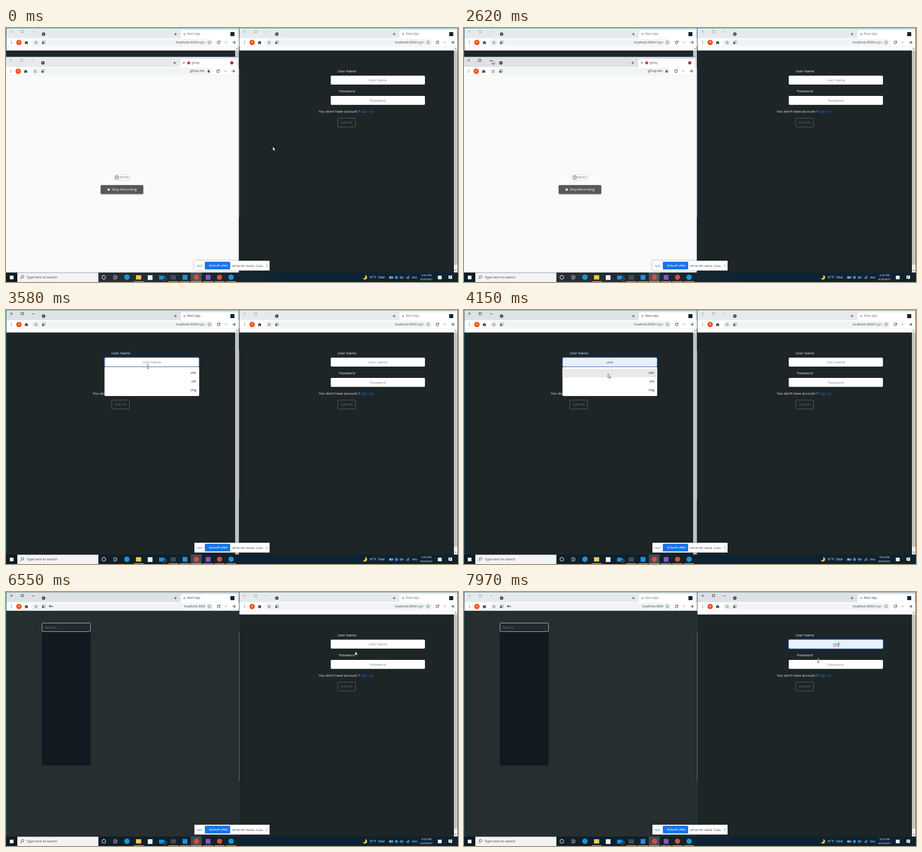
Recreate the animation shown at these times as an HTML page with a canvas. Size 998 by 561 pixels, loop 8000 ms.

```html
<!DOCTYPE html>
<html lang="en">
<head>
<meta charset="utf-8">
<title>Login demo</title>
<style>
  html, body { margin: 0; width: 100%; height: 100%; overflow: hidden; background: #1d2527; }
  canvas { display: block; }
</style>
</head>
<body>
<canvas id="stage" width="998" height="561"></canvas>
<script>
const g = document.getElementById('stage').getContext('2d');
const LOOP = 8000, SANS = '"Open Sans", "Noto Sans", sans-serif', ARABIC = '"DejaVu Sans", sans-serif';
const USERS = ['uhe', 'uht', 'uhg'];
const PAGE = '#1d2527', EDGE = '#245364';

// Pointer path: time, x, y
const POINTER = [
  [0, 589, 262], [480, 589, 262], [1300, 300, 75], [1420, 296, 75], [2060, 72, 72], [2180, 72, 72],
  [2220, 62, 71], [2655, 62, 71], [2660, 155, 83], [2710, 155, 83], [3060, 313, 125],
  [3600, 313, 125], [4000, 318, 141], [4340, 318, 141], [4510, 322, 155], [5600, 322, 155],
  [6160, 602, 148], [6360, 602, 148], [6550, 771, 131], [6650, 771, 131], [6950, 780, 117],
  [7400, 780, 117], [7750, 782, 152], [8000, 782, 152]];

function rect(x, y, w, h, fill) { g.fillStyle = fill; g.fillRect(x, y, w, h); }

function box(x, y, w, h, r, fill, stroke, width = 1) {
  g.beginPath();
  g.roundRect(x, y, w, h, r);
  if (fill) { g.fillStyle = fill; g.fill(); }
  if (stroke) { g.strokeStyle = stroke; g.lineWidth = width; g.stroke(); }
}

function dot(x, y, r, fill, stroke, width = 1) {
  g.beginPath();
  g.arc(x, y, r, 0, 7);
  if (fill) { g.fillStyle = fill; g.fill(); }
  if (stroke) { g.strokeStyle = stroke; g.lineWidth = width; g.stroke(); }
}

function path(x, y, d, stroke, width = 1, fill) {
  g.save();
  g.translate(x, y);
  const p = new Path2D(d);
  if (fill) { g.fillStyle = fill; g.fill(p); }
  if (stroke) { g.strokeStyle = stroke; g.lineWidth = width; g.stroke(p); }
  g.restore();
}

function text(s, x, y, size, fill, align = 'left', font = SANS, weight = 400) {
  g.font = `${weight} ${size}px ${font}`;
  g.textAlign = align;
  g.textBaseline = 'middle';
  g.fillStyle = fill;
  g.fillText(s, x, y);
  return g.measureText(s).width;
}

// Browser frame; left items hang on l, right items on r
function browser(l, r, y, o) {
  const ink = o.active ? '#202124' : '#9b9fa3', gray = '#5f6368';
  const x = Math.max(l, 0), w = r - x;
  g.save();
  g.translate(0, y);
  rect(x, 0, w, 23, o.active ? '#dee1e6' : '#e7eaed');
  rect(x, 22.5, w, 18.5, '#fff');
  rect(x, 41, w, .5, '#d5d7da');
  rect(x, 0, w, .6, EDGE);
  box(r - 129, 5, 125, 19, [4, 4, 0, 0], '#fff');
  path(l + 12, 8, 'M-2.5-2.5 2.5 2.5M2.5-2.5-2.5 2.5', ink, .9);
  box(l + 33.5, 5.5, 5, 5, 0, null, ink, .9);
  path(l + 60, 8.5, 'M-2.5 0H2.5', ink, .9);
  dot(l + 83, 13.5, 3.8, '#3c4043');
  path(l + 83, 13.5, 'M-1.7-.8H1.7L0 1.4Z', null, 1, '#fff');
  path(r - 141, 13.5, 'M-3 0H3M0-3V3', '#3c4043');
  path(r - 121, 13.5, 'M-2-2 2 2M2-2-2 2', '#3c4043', .9);

  if (o.recorder) {
    dot(r - 110, 13.5, 3.2, '#e0392f');
    text(o.title, r - 103.5, 13.5, 6.2, '#555');
    dot(r - 15, 13.5, 3.5, '#a8322d');
  } else {
    text(o.title, r - 115, 13.5, 6.2, o.active ? '#3c4043' : '#666a6e');
    box(r - 19.5, 9, 9, 9, 1, '#15232d');
  }

  box(l + 56, 24.5, r - l - 113, 15, 7.5, '#f1f3f4');
  for (const dy of [-2.7, 0, 2.7]) dot(l + 12, 32 + dy, .8, '#3c4043');
  dot(l + 28.5, 32, 6, '#f4511e');
  text('a', l + 28.5, 31.5, 7, '#fff', 'center');
  path(l + 45, 32, 'M-3.5-2H-1.2A1.2 1.2 0 0 1 1.2-2H3V0A1.2 1.2 0 0 1 3 2.2V3.7H1A1.2 1.2 0 0 0-1.4 3.7H-3.5V1.8A1.2 1.2 0 0 0-3.5-.4Z', null, 1, '#4a4d51');
  path(l + 66, 32, 'M0-3.5 1-1.1 3.5-1 1.6.7 2.2 3.2 0 1.8-2.2 3.2-1.6.7-3.5-1-1-1.1Z', gray, .8);
  box(l + 81, 28.5, 5.5, 5.5, 1, null, gray, .8);
  box(l + 79.5, 30.5, 4.5, 5, 1, gray);
  if (o.key) {
    dot(l + 97.2, 31.5, 1.6, null, '#3c4043', 1.2);
    path(l + 99, 31.5, 'M0 0H4V1.8M2.5 0V1.5', '#3c4043', 1.1);
  }
  const routeWidth = o.route ? text(o.route, r - 75, 31.8, 6.9, '#6a6e72', 'right') : 0;
  text(o.host, r - 75 - routeWidth, 31.8, 6.9, '#3c4043', 'right');
  if (o.recorder) {
    box(r - 68.3, 30.7, 4.6, 4, .5, '#4a4d51');
    path(r - 66, 31, 'M-1.3 0V-1A1.3 1.3 0 0 1 1.3-1V0', '#4a4d51', .8);
  } else {
    dot(r - 66, 31.8, 3.3, null, gray, .8);
    path(r - 66, 31.8, 'M0-.4V1.8M0-1.8V-1', gray, .9);
  }
  path(r - 45.5, 31.8, 'M2.3-2A3.1 3.1 0 1 0 3.1.6M3-3.5V-1.1H.6', '#4a4d51', 1.1);
  path(r - 28.5, 31.8, 'M3.3 0H-3.2M0-3.2-3.2 0 0 3.2', '#b8bbbe');
  path(r - 12, 31.8, 'M-3.5 0H3.2M0-3.2 3.2 0 0 3.2', '#3c4043', 1.1);
  g.restore();
}

function field(x, y, label, value, o = {}) {
  if (o.focus) box(x - .9, y - .9, 209.8, 21.5, 3, null, 'rgba(0,123,255,.36)', 1.8);
  box(x, y, 208, 19.7, 2.2, o.filled ? '#e8f0fe' : '#fff', o.focus ? '#80bdff' : null, .5);
  const cx = x + 104, cy = y + 10.6;
  if (o.dots) {
    for (let i = 0; i < o.dots; i++) dot(cx + (i - (o.dots - 1) / 2) * 3.4, cy, 1.15, '#333a40');
  } else {
    text(value || label, cx, cy, 7.9, value ? '#39424a' : '#7b8288', 'center');
  }
  const half = o.dots ? o.dots * 1.7 : value ? g.measureText(value).width / 2 : 0;
  if (o.spell) path(cx - half, cy + 4.4, `M0 0H${half * 2}`, '#e0484a', .9);
  if (o.caret) rect(cx + half + .1, cy - 5, .8, 10, '#222');
}

// Login page; x is the left edge of its inputs
function login(x, user, pass) {
  text('User Name', x + 15, 95.5, 7.9, '#f4f5f5');
  field(x, 105.3, 'User Name', user.value, user);
  text('Password', x + 18, 140.2, 7.9, '#f4f5f5');
  field(x, 150.1, 'Password', '', pass);
  const w = text('You don‘t have account ? ', x - 26.5, 184.7, 7.9, '#f4f5f5');
  text('Sign Up', x - 26.5 + w, 184.7, 7.9, '#1478f0');
  box(x + 15.5, 199, 39, 19.5, 2, null, '#626b70', .9);
  text('Submit', x + 35, 209, 7.9, '#626b70', 'center');
  if (!user.list) return;
  box(x - .5, 126, 209, 64, [0, 0, 2, 2], '#fff');
  if (user.hover >= 0) rect(x - .5, 130 + user.hover * 18.7, 209, 18.7, '#e9e9ea');
  USERS.forEach((name, i) => text(name, x + 202, 139.5 + i * 18.7, 7, '#222', 'right'));
}

function scrollbar(x, thumbEnd) {
  rect(x, 41.5, 8, 498.5, '#f1f1f1');
  rect(x + .5, 50, 7, thumbEnd - 50, '#c1c1c1');
  path(x + 4, 46, 'M-2 1H2L0-1.3Z', null, 1, '#777');
  if (thumbEnd < 540) path(x + 4, 535, 'M-2-1H2L0 1.3Z', null, 1, '#555');
}

function leftWindow(t) {
  const home = t >= 5500;
  const active = t >= 3020 && t < 6900;
  rect(0, 0, 515, 540, home ? '#262e30' : PAGE);
  if (home) {
    rect(79, 88, 108, 295, '#111a20');
    box(79.5, 68.5, 107, 19, 2, '#222a2d', '#c5c9ca', 1);
    text('Search', 85.5, 78.7, 7.9, '#70787d');
  } else {
    rect(0, 41, 514, 8.7, '#fff');
    const filled = t >= 4000, onPass = t >= 4430;
    login(218,
      { value: filled ? USERS[0] : '', filled, focus: t >= 3040 && !onPass, caret: t >= 4200 && !onPass,
        list: t >= 3480 && t < 4200, hover: filled ? 0 : -1 },
      { focus: onPass, caret: onPass, dots: (t >= 4720) + (t >= 4920) + (t >= 5240) });
    scrollbar(506, 540);
  }
  browser(0, 515, 0, { active, title: 'React App', host: 'localhost:3000', route: home ? '' : '/login', key: t >= 4720 });
  rect(0, 0, 1, 540, active ? '#1d6a80' : EDGE);
}

function rightWindow(t) {
  const active = t >= 330 && t < 1480 || t >= 2660 && t < 3020 || t >= 6900;
  rect(515, 0, 483, 540, PAGE);
  rect(515, 41, 483, 8.7, '#fff');
  const filled = t >= 7600, chosen = t >= 7920;
  login(717,
    { value: filled ? USERS[1] : '', filled, focus: t >= 6980, caret: chosen, spell: chosen,
      list: t >= 7220 && !chosen, hover: filled ? 1 : -1 }, {});
  scrollbar(989, 523);
  browser(515, 998, 0, { active, title: 'React App', host: 'localhost:3000', route: '/login' });
  rect(997, 0, 1, 540, EDGE);
  rect(514.5, 0, 1, 540, '#16404f');
  rect(514.5, 90, 1, 328, '#747d7f');
}

function recorder(t) {
  rect(0, 64, 513.5, 476, '#fafafa');
  browser(-1.5, 513.5, 63.5, { active: t >= 1480, title: 'gifcap', host: 'gifcap.dev', recorder: true });
  box(238, 323.5, 35.5, 13, 1, '#fdfdfd', '#d4d4d4', .8);
  dot(244.7, 330, 3.9, null, '#333', 1);
  path(244.7, 330, 'M0-2.4V0L1.7 1', '#333', .9);
  text('00:0' + Math.min(2, Math.floor(t / 1000)), 251, 330.2, 7.9, '#666');
  g.save();
  g.shadowColor = 'rgba(0,0,0,.35)';
  g.shadowBlur = 3;
  g.shadowOffsetY = 1;
  box(209, 347, 94, 19.5, 2, '#585858');
  g.restore();
  rect(224.5, 354.7, 4.5, 4.5, '#fff');
  text('Stop Recording', 233, 357, 7.9, '#fff');
}

// The recorder shrinking away, faded towards the page behind it
function minimizing(t) {
  g.save();
  g.beginPath();
  g.rect(0, 0, 998, 540);
  g.clip();
  g.translate(191, 242);
  g.scale(.552, .552);
  recorder(t);
  g.globalAlpha = .83;
  rect(-1, 63, 515.5, 480, PAGE);
  g.restore();
}

function shareBar() {
  g.save();
  g.shadowColor = 'rgba(0,0,0,.35)';
  g.shadowBlur = 4;
  rect(416, 514, 166, 21.7, '#fff');
  g.restore();
  text('إخفاء', 427, 525, 6, '#1a73e8', 'center', ARABIC);
  box(439, 516.3, 56, 17, 2, '#1a73e8');
  text('إيقاف المشاركة', 467, 525, 5.2, '#fff', 'center', ARABIC, 700);
  text('gifcap.dev', 500, 525, 6, '#333');
  g.direction = 'rtl';
  text('.يشارك شاشتك', 569, 525, 6, '#333', 'right', ARABIC);
  g.direction = 'ltr';
  path(575.5, 525, 'M-1-3V3M1-3V3', '#aaa', .8);
}

function taskbar(t) {
  const shade = g.createLinearGradient(204, 0, 620, 0);
  shade.addColorStop(0, t < 2660 ? '#2a3034' : '#101f29');
  shade.addColorStop(1, '#0e2331');
  rect(0, 540, 998, 21, shade);
  rect(0, 540, 25, 21, '#0f1c25');
  rect(25, 540.5, 179, 20.5, '#f3f3f3');
  rect(8.5, 547, 8, 8, '#fff');
  dot(36.5, 549.5, 2.8, null, '#222', .9);
  path(34.5, 551.6, 'M0 0-2.8 3', '#222', .9);
  text('Type here to search', 45.5, 551, 7.4, '#3a3a3a');

  dot(216, 550.7, 4, null, '#fff', 1.2);
  path(241, 550.7, 'M-3.5-2H2V2H-3.5ZM-3.5-4H2M-3.5 4H2M4-4V4', '#e8e8e8', .8);
  rect(408, 540, 24, 21, 'rgba(255,255,255,.2)');
  dot(267, 550.5, 6, '#1f93cf');
  rect(287, 546, 11.5, 9.5, '#f4c74c');
  rect(313, 546, 10.5, 10.5, '#f2f2f2');
  rect(338, 547, 11.5, 8.5, '#1b8fe0');
  dot(350.5, 554, 4, '#20282d', '#9aa3a8', .6);
  text('1', 350.5, 553.8, 5.5, '#fff', 'center');
  rect(363.5, 546, 11.5, 9.5, '#454b50');
  rect(390, 545.5, 10.5, 10.5, '#2490dc');
  dot(420.5, 550.5, 5.8, '#dd4b3c');
  rect(441, 545.5, 10.5, 10.5, '#8a56c5');
  dot(471.5, 550.5, 5.8, '#dd4b3c');
  dot(497, 550.5, 6, '#1f93cf');
  for (const x of [282, 358.5, 384, 408, 435, 460.5, 486]) rect(x, 559.5, x === 408 ? 24 : 22, 1.5, '#76b9ed');

  path(792, 550.7, 'M1-5A5 5 0 1 1-4 2.5A5 5 0 0 0 1-5Z', null, 1, '#f7c948');
  text('91°F', 803, 551, 6.6, '#fff');
  text('Clear', 821, 551, 6.6, '#fff');
  box(846.5, 549, 7, 4, 0, null, '#e8e8e8', .8);
  rect(847.5, 550, 3.5, 2, '#e8e8e8');
  rect(854, 550, 1, 2, '#e8e8e8');
  dot(862, 551, 3.2, '#2a91e0');
  path(873, 551, 'M-3-1H-1.3L.5-3V3L-1.3 1H-3ZM2-1.5 5 1.5M5-1.5 2 1.5', '#e8e8e8', .8);
  path(884.5, 554, 'M0 0A6 6 0 0 1 6-6M2 0A4 4 0 0 1 6-4M4 0A2 2 0 0 1 6-2', '#c8ced2', .9);
  text('ENG', 896.5, 551, 6, '#fff');
  text('9:32 PM', 928.5, 546, 5.9, '#fff', 'center');
  text('6/20/2021', 928.5, 555, 5.8, '#fff', 'center');
  rect(953.5, 547, 8.5, 8, '#f0f0f0');
  path(981, 550.5, 'M-4-3.7H4V3H1.8V5L-.3 3H-4Z', null, 1, '#fff');
  path(981, 550.5, 'M-2.4-1.7H2.4M-2.4.3H2.4', '#0e2230', .7);
}

function pointer(t) {
  const i = Math.max(1, POINTER.findIndex(k => k[0] > t));
  const [t0, x0, y0] = POINTER[i - 1], [t1, x1, y1] = POINTER[i];
  const u = (t - t0) / (t1 - t0), e = u * u * (3 - 2 * u);
  const x = x0 + (x1 - x0) * e, y = y0 + (y1 - y0) * e;
  const beam = t >= 3040 && t < 3700 || t >= 4420 && t < 5500 || t >= 6930 && t < 7500 || t >= 7920;
  if (beam) {
    const d = 'M-1.8-4H1.8M-1.8 4H1.8M0-4V4';
    path(x, y, d, '#fff', 1.8);
    path(x, y, d, '#222', .9);
  } else {
    path(x, y, 'M0 0V9L2.1 7.1 3.5 10.2 4.9 9.6 3.5 6.6H6.3Z', '#111', .7, '#fff');
  }
}

function draw(t) {
  leftWindow(t);
  rightWindow(t);
  if (t < 2660) recorder(t);
  else if (t < 2710) minimizing(t);
  taskbar(t);
  shareBar();
  pointer(t);
}

function tick() {
  draw(performance.now() % LOOP);
  requestAnimationFrame(tick);
}
tick();
</script>
</body>
</html>
```
